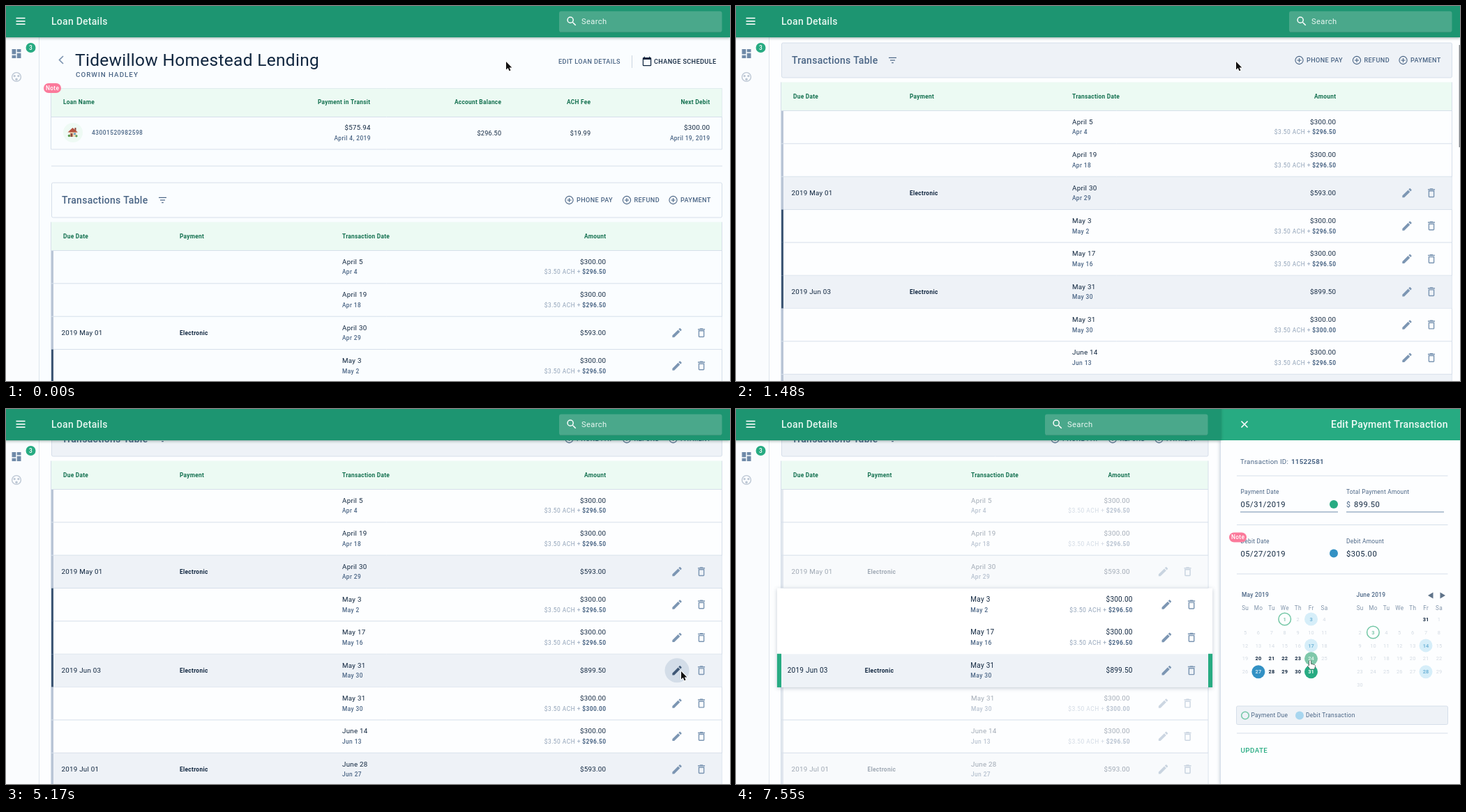
An HTML page with a canvas for the animation above (8000 ms loop, 1038x539 px).

```html
<!DOCTYPE html>
<html lang="en">
<head>
<meta charset="utf-8">
<title>Loan Details</title>
<style>
html, body { margin: 0; width: 100%; height: 100%; overflow: hidden; background: #fff; }
canvas { display: block; }
</style>
</head>
<body>
<canvas id="stage" width="1038" height="539"></canvas>
<script>
const ctx = document.getElementById('stage').getContext('2d');
const LOOP = 8000, STEP = 147.9, ROW_H = 47.35;
const INK = '#10263f', SLATE = '#4a6585', MUTED = '#8fa1b7', LINE = '#d6dfea',
      GREEN = '#27ab82', DEEP = '#13704f', MINT = '#ecfaf3', BLUE = '#3391c4', SKY = '#d6eef9';

const ICON = {
  pencil: 'M3 17.25V21h3.75L17.81 9.94l-3.75-3.75zM20.71 7.04c.39-.39.39-1.02 0-1.41l-2.34-2.34c-.39-.39-1.02-.39-1.41 0l-1.83 1.83 3.75 3.75z',
  trash: 'M6 19c0 1.1.9 2 2 2h8c1.1 0 2-.9 2-2V7H6zM8 9h8v10H8zM15.5 4l-1-1h-5l-1 1H5v2h14V4z',
  search: 'M15.5 14h-.79l-.28-.27A6.47 6.47 0 0 0 16 9.5 6.5 6.5 0 1 0 9.5 16c1.61 0 3.09-.59 4.23-1.57l.27.28v.79l5 4.99L20.49 19zM9.5 14a4.5 4.5 0 1 1 0-9 4.5 4.5 0 0 1 0 9z',
  calendar: 'M20 3h-1V1h-2v2H7V1H5v2H4a2 2 0 0 0-2 2v16a2 2 0 0 0 2 2h16a2 2 0 0 0 2-2V5a2 2 0 0 0-2-2zM20 21H4V8h16z',
  board: 'M3 13h8V3H3zM3 21h8v-6H3zM13 21h8V11h-8zM13 3v6h8V3z'
};
for (const k in ICON) ICON[k] = new Path2D(ICON[k]);
const ARROW = new Path2D('M0 0V11.6L2.7 9.1 4.5 13.3 6.5 12.4 4.7 8.4H8.3Z');
const HAND = new Path2D('M-1.2 1q0-1.2 1.2-1.2t1.2 1.2v4l5 1.2q1.2.4 1 1.8l-1 4.2h-6l-3.4-4.5q.6-1.4 2-.2z');

const ROWS = [
  ['April 5', 'Apr 4'], ['April 19', 'Apr 18'], ['April 30', 'Apr 29', '2019 May 01', '$593.00'],
  ['May 3', 'May 2'], ['May 17', 'May 16'], ['May 31', 'May 30', '2019 Jun 03', '$899.50'],
  ['May 31', 'May 30'], ['June 14', 'Jun 13'], ['June 28', 'Jun 27', '2019 Jul 01', '$593.00']
];

// Motion, one value per screen update; the last entry holds.
const SCROLL = [0, 12, 52, 109, 152, 178, 188, 188, 201, 214, 224, 230, 234, 236];
const POINTER = [
  [0, 717, 80], [14, 718, 150], [15, 719, 250], [16, 720, 345], [17, 721, 382], [18, 806, 382],
  [20, 874, 377], [22, 917, 377], [24, 929, 377], [25, 942, 364], [26, 956, 340], [27, 962, 336],
  [28, 965, 356], [29, 967, 372], [30, 968, 377], [44, 955, 358], [45, 912, 285], [46, 868, 205],
  [47, 845, 180], [48, 822, 225], [49, 812, 305], [50, 820, 350], [51, 823, 361.5]
];
const PANEL = [0, .6, .994, 1], TABLE = [0, .23, .727, 1], DIM = [0, .5, 1];
const held = (list, i) => list[Math.max(0, Math.min(i, list.length - 1))];
const mix = (a, b, p) => a + (b - a) * p;

// y is the middle of the capitals
function text(s, x, y, size, color, { w = 400, a = 'left', ls = .25 } = {}) {
  ctx.font = `${w} ${size}px Roboto, sans-serif`;
  ctx.letterSpacing = ls + 'px';
  ctx.textAlign = a;
  ctx.fillStyle = color;
  const trail = a === 'right' ? ls : a === 'center' ? ls / 2 : 0;
  ctx.fillText(s, x + trail, y + size * .355);
}
function rect(x, y, w, h, fill, stroke, r = 0) {
  ctx.beginPath();
  ctx.roundRect(x, y, w, h, r);
  if (fill) { ctx.fillStyle = fill; ctx.fill(); }
  if (stroke) { ctx.strokeStyle = stroke; ctx.lineWidth = 1; ctx.stroke(); }
}
function line(color, width, ...p) {
  ctx.beginPath();
  for (let i = 0; i < p.length; i += 2) ctx.lineTo(p[i], p[i + 1]);
  ctx.strokeStyle = color;
  ctx.lineWidth = width;
  ctx.stroke();
}
function dot(x, y, r, fill, stroke, width = 1.5) {
  ctx.beginPath();
  ctx.arc(x, y, r, 0, 7);
  if (fill) { ctx.fillStyle = fill; ctx.fill(); }
  if (stroke) { ctx.strokeStyle = stroke; ctx.lineWidth = width; ctx.stroke(); }
}
function poly(color, ...p) {
  ctx.beginPath();
  for (let i = 0; i < p.length; i += 2) ctx.lineTo(p[i], p[i + 1]);
  ctx.fillStyle = color;
  ctx.fill();
}
function icon(name, x, y, scale, color) {
  ctx.save();
  ctx.translate(x, y);
  ctx.scale(scale, scale);
  ctx.translate(-12, -12);
  ctx.fillStyle = color;
  ctx.fill(ICON[name], 'evenodd');
  ctx.restore();
}
function shadow(color, blur, dx, dy) {
  ctx.shadowColor = color;
  ctx.shadowBlur = blur;
  ctx.shadowOffsetX = dx;
  ctx.shadowOffsetY = dy;
}
function note(x, y) {
  rect(x, y, 25, 14, '#fb7a9b', null, 7);
  text('Note', x + 12.5, y + 7, 8.4, '#fff', { w: 500, a: 'center' });
}
function addButton(label, x, y) {
  dot(x, y, 5.6, null, SLATE, 1.1);
  line(SLATE, 1.1, x - 3, y, x + 3, y);
  line(SLATE, 1.1, x, y - 3, x, y + 3);
  text(label, x + 10.5, y, 9.1, SLATE, { w: 500, ls: .4 });
}
function house(x, y) {
  dot(x, y, 14, '#eefaf4');
  rect(x - 5, y - 2, 10, 8, '#f1d9b8');
  rect(x + 2.5, y - 7, 2, 4, '#8d4a3c');
  poly('#b5533f', x - 7.5, y - .5, x - .5, y - 7, x + 7, y - .5);
  rect(x - 3.5, y + 1, 3, 5, '#8d4a3c');
  rect(x + 1, y + .5, 3, 2.5, '#6aa5cc');
  dot(x - 5.5, y + 4.5, 1.8, '#5b9a50');
  dot(x + 5, y + 4.8, 1.6, '#5b9a50');
}

function summary(s) {
  line('#7d95b1', 1.7, 82, 72 - s, 76.5, 77.5 - s, 82, 83 - s);
  text('Tidewillow Homestead Lending', 99, 77 - s, 24.5, INK, { ls: .3 });
  text('CORWIN HADLEY', 100, 99 - s, 9.8, SLATE, { w: 500, ls: 1 });
  text('EDIT LOAN DETAILS', 792, 80 - s, 9.1, SLATE, { w: 500, ls: .4 });
  line('#cbd5e0', 1, 897.5, 71 - s, 897.5, 89 - s);
  icon('calendar', 919, 79.5 - s, .62, INK);
  text('CHANGE SCHEDULE', 929, 80 - s, 9.1, INK, { w: 500, ls: .4 });

  rect(64.5, 118.5 - s, 962, 87.5, null, LINE);
  rect(65, 118.5 - s, 961.5, 41, MINT);
  line(LINE, 1, 65, 159.5 - s, 1026, 159.5 - s);
  note(54, 111 - s);
  const right = { a: 'right' }, head = { w: 600, a: 'right' }, sub = { w: 500, a: 'right', ls: .4 };
  text('Loan Name', 82, 138.5 - s, 8.4, DEEP, { w: 600 });
  text('Payment in Transit', 522, 138.5 - s, 8.4, DEEP, head);
  text('Account Balance', 710, 138.5 - s, 8.4, DEEP, head);
  text('ACH Fee', 838, 138.5 - s, 8.4, DEEP, head);
  text('Next Debit', 1009, 138.5 - s, 8.4, DEEP, head);
  house(96, 182 - s);
  text('43001520982598', 123, 182.5 - s, 8.4, SLATE, { w: 500, ls: .48 });
  text('$575.94', 522.5, 175 - s, 9.8, INK, right);
  text('April 4, 2019', 522.5, 190 - s, 8.4, SLATE, sub);
  text('$296.50', 710, 182.5 - s, 9.1, INK, right);
  text('$19.99', 838, 182.5 - s, 9.1, INK, right);
  text('$300.00', 1009, 175 - s, 9.8, INK, right);
  text('April 19, 2019', 1009, 190 - s, 8.4, SLATE, sub);
  line(LINE, 1, 65, 230 - s, 1027, 230 - s);
}

function row(i, top, st) {
  const { m, right, shade, hover } = st;
  const [date, sent, due, total] = ROWS[i];
  const active = i > 2 && i < 6, mid = top + 23.5;
  ctx.save();
  if (active) {
    const cx = (65 + right) / 2, k = 1 + .02 * st.dim;
    ctx.translate(cx, mid);
    ctx.scale(k, k);
    ctx.translate(-cx, -mid);
  } else ctx.globalAlpha = 1 - .62 * st.dim;
  if (due) rect(65, top + .5, right - 65, ROW_H - .5, shade);
  if (!active || st.dim < .5) rect(65, top, 3, ROW_H, active ? '#3f5876' : '#b9c5d6');
  else if (i === 5) {
    rect(65, top, 6, ROW_H, GREEN);
    rect(right - 6, top, 6, ROW_H, GREEN);
  }
  const dateX = mix(482, 337, m), amountX = mix(860, 564.5, m);
  text(date, dateX, top + 16, 9.8, INK);
  text(sent, dateX, top + 31, 8.4, SLATE, { w: 500, ls: .4 });
  if (due) {
    text(due, 79.5, mid, 9.8, INK);
    text('Electronic', mix(249, 188.5, m), mid, 8.4, INK, { w: 600, ls: .3 });
    text(total, amountX, mid, 9.8, INK, { a: 'right' });
  } else {
    text('$300.00', amountX, top + 16, 9.8, INK, { a: 'right' });
    text(i === 6 ? '$300.00' : '$296.50', amountX, top + 31, 8.4, SLATE, { w: 600, a: 'right', ls: .4 });
    text('$3.50 ACH +', amountX - 36.5, top + 31, 8.4, MUTED, { a: 'right', ls: .5 });
  }
  if (i > 1) {
    const x = mix(962, 612.5, m), hot = hover === i;
    if (hot) dot(x, mid, 17.5, '#d3dde8');
    icon('pencil', x, mid, .74, hot ? '#3f5876' : '#7c96b3');
    icon('trash', x + 35, mid, .72, '#7c96b3');
  }
  ctx.restore();
}

function transactions(s, st) {
  const { m, right, shade } = st, y = 279 - s, shift = 350 * m;
  rect(65.5, 254 - s, right - 65.5, 50, shade, LINE, 2);
  text('Transactions Table', 80, y, 14, SLATE, { w: 500 });
  [5.5, 3.5, 1.3].forEach((w, k) => line(SLATE, 1.2, 224.5 - w, y - 3.6 + k * 3.6, 224.5 + w, y - 3.6 + k * 3.6));
  addButton('PHONE PAY', 807.5 - shift, y);
  addButton('REFUND', 890 - shift, y);
  addButton('PAYMENT', 956.5 - shift, y);

  const top = 351.5 - s, head = { w: 600 };
  rect(65, 310.5 - s, right - 65, 41, MINT);
  text('Due Date', 82, 331 - s, 8.4, DEEP, head);
  text('Payment', mix(249, 188.5, m), 331 - s, 8.4, DEEP, head);
  text('Transaction Date', mix(482, 337, m), 331 - s, 8.4, DEEP, head);
  text('Amount', mix(860, 564.5, m), 331 - s, 8.4, DEEP, { w: 600, a: 'right' });
  line(LINE, 1, 64.5, 310.5 - s, 64.5, 539);
  line(LINE, 1, right, 310.5 - s, right, 539);

  const rowTop = i => top + i * ROW_H;
  const each = active => ROWS.forEach((_, i) => {
    if ((i > 2 && i < 6) === active) row(i, rowTop(i), st);
  });
  each(false);
  ROWS.forEach((_, i) => line(LINE, 1, 65, rowTop(i), right, rowTop(i)));
  if (st.dim) {
    const grow = (right - 65) * .01 * st.dim;
    ctx.save();
    shadow('rgba(40,65,95,.28)', 6, 0, 1);
    rect(65 - grow, rowTop(3), right - 65 + 2 * grow, ROW_H * 3, '#fff');
    ctx.restore();
  }
  each(true);
}

function month(title, x, first, days, styleOf) {
  text(title, x - 5, 267.5, 8.4, SLATE, { w: 500 });
  const col = c => x + c * 18.9;
  ['Su', 'Mo', 'Tu', 'We', 'Th', 'Fr', 'Sa'].forEach((d, c) =>
    text(d, col(c), 286.5, 8.2, '#8295ab', { a: 'center' }));
  for (let d = 1; d <= days; d++) {
    const k = first + d - 1, cx = col(k % 7), cy = 302 + Math.floor(k / 7) * 18.95;
    const [ink, fill, ring] = styleOf(d);
    if (fill || ring) dot(cx, cy, ring ? 8.8 : 9.5, fill, ring);
    text(d, cx, cy, 7.4, ink, { w: fill || ring || ink === INK ? 600 : 400, a: 'center', ls: .2 });
  }
}
const PALE = ['#d3dae3'], DUE = ['#7fc7aa', null, '#74c7a6'], DEBIT = ['#72b5d8', SKY];
const mayStyle = picking => d =>
  d === 1 ? DUE : d === 3 || d === 17 ? DEBIT : d === 27 ? ['#cfe6f3', BLUE] : d === 31 ? ['#fff', GREEN] :
  d === 24 && picking ? ['#d8f0e5', '#7fc8aa'] : (d > 19 && d < 25) || d > 27 ? [INK] : PALE;
const juneStyle = d => d === 3 ? DUE : d === 14 || d === 28 ? DEBIT : PALE;

function panel(p, picking) {
  ctx.save();
  ctx.translate((1 - p) * 344, 0);
  ctx.save();
  shadow('rgba(40,65,95,.2)', 4, -1, 0);
  rect(694, 0, 350, 539, '#fdfeff');
  ctx.restore();
  line(LINE, 1, 694.5, 45, 694.5, 539);
  rect(694, 0, 350, 45, GREEN);
  line('#fff', 1.6, 724.5, 17.5, 733.5, 26.5);
  line('#fff', 1.6, 733.5, 17.5, 724.5, 26.5);
  text('Edit Payment Transaction', 1020.5, 22, 14, '#f1fbf7', { w: 500, a: 'right', ls: .3 });

  for (const y of [96, 166.5, 237, 466]) line(LINE, 1, 718, y, 1020.5, y);
  text('Transaction ID:', 723, 76, 9.8, SLATE);
  text('11522581', 796, 76, 9.8, SLATE, { w: 600 });
  const field = (label, value, x, y) => {
    text(label, x, y, 8.4, SLATE);
    text(value, x, y + 18, 11.2, INK, { ls: .5 });
  };
  field('Payment Date', '05/31/2019', 723.5, 119);
  field('Debit Date', '05/27/2019', 723.5, 190);
  field('Debit Amount', '$305.00', 875, 190);
  field('Total Payment Amount', '', 875, 119);
  text('$', 875, 137, 10.5, SLATE);
  text('899.50', 886, 137, 11.2, INK, { ls: .5 });
  line('#6f8cab', 1, 723, 148, 863, 148);
  line('#6f8cab', 1, 875, 148, 1015, 148);
  dot(857, 137, 6, GREEN);
  dot(857, 207.5, 6, BLUE);
  note(707, 177.5);

  month('May 2019', 730, 3, 31, mayStyle(picking));
  month('June 2019', 894.5, 6, 30, juneStyle);
  text('31', 989, 302, 7.4, INK, { w: 600, a: 'center', ls: .2 });
  poly('#5f7389', 999.5, 263.5, 999.5, 272.5, 992, 268);
  poly('#5f7389', 1009.5, 263.5, 1009.5, 272.5, 1017, 268);

  rect(717.5, 427, 303, 26.5, '#eef2f7', LINE, 2);
  dot(730, 440.5, 5.3, null, '#74c7a6');
  text('Payment Due', 738.5, 440, 8.4, SLATE, { ls: .3 });
  dot(808, 440.5, 6, '#a8d6ef');
  text('Debit Transaction', 817, 440, 8.4, SLATE, { ls: .3 });
  text('UPDATE', 723.5, 491, 9.8, GREEN, { w: 500, ls: .4 });
  ctx.restore();
}

function chrome(m) {
  rect(0, 45, 47, 494, '#fafcfe');
  line('#dde4ec', 1, 47.5, 45, 47.5, 539);
  icon('board', 15, 68.5, .72, '#6f8aa8');
  dot(35.5, 60, 7, GREEN);
  text('3', 35.5, 60, 8.4, '#fff', { w: 500, a: 'center', ls: 0 });
  dot(15, 102, 6.4, null, '#bcc7d4', 1.4);
  dot(12.2, 100.6, 1.6, '#bcc7d4');
  dot(17.8, 100.6, 1.6, '#bcc7d4');
  dot(15, 105.4, 1.8, '#bcc7d4');

  ctx.save();
  shadow('rgba(0,50,35,.4)', 4, 0, 1);
  rect(-8, -8, mix(1046, 703, m), 53, '#1d9571');
  ctx.restore();
  for (const y of [17.5, 21.8, 26.1]) line('#fff', 1.6, 14.5, y, 27.5, y);
  text('Loan Details', 65, 22, 14, '#e6f6f0', { w: 500 });
  const x = 793 - 350 * m;
  rect(x, 7.5, 233.5, 30, '#4aa88b', null, 3);
  line('#3b977b', 1, x + 1, 37.5, x + 232, 37.5);
  icon('search', x + 18, 22, .74, '#fff');
  text('Search', x + 32, 22, 11.2, '#eaf7f2', { ls: .38 });
}

function pointer(n) {
  const [, x, y] = POINTER.filter(k => k[0] <= n).pop();
  const hand = n > 50, shape = hand ? HAND : ARROW;
  ctx.save();
  ctx.translate(x, y);
  ctx.lineJoin = 'round';
  ctx.lineWidth = hand ? 1 : 1.8;
  ctx.strokeStyle = hand ? '#111' : '#fff';
  ctx.stroke(shape);
  ctx.fillStyle = hand ? '#fff' : '#111';
  ctx.fill(shape);
  ctx.restore();
}

function draw(time) {
  const n = Math.floor((time + 8) / STEP);
  const s = held(SCROLL, n - 2), m = held(TABLE, n - 35), p = held(PANEL, n - 35);
  const resting = n < 3;
  const state = {
    m, right: mix(1026.5, 677, m), dim: held(DIM, n - 35),
    shade: resting ? '#fafdff' : '#eef2f7',
    hover: n === 26 || n === 27 ? 4 : n > 28 && n < 37 ? 5 : -1
  };
  rect(0, 0, 1038, 539, resting ? '#fafdff' : '#fdfeff');
  summary(s);
  transactions(s, state);
  if (n > 3 && n < 16) rect(1036.6, 56 + (s - 201) * .28, 1.4, 147, '#85898d');
  if (p) panel(p, n > 49);
  chrome(m);
  pointer(n);
}

function tick() {
  draw(performance.now() % LOOP);
  requestAnimationFrame(tick);
}
tick();
</script>
</body>
</html>
```
